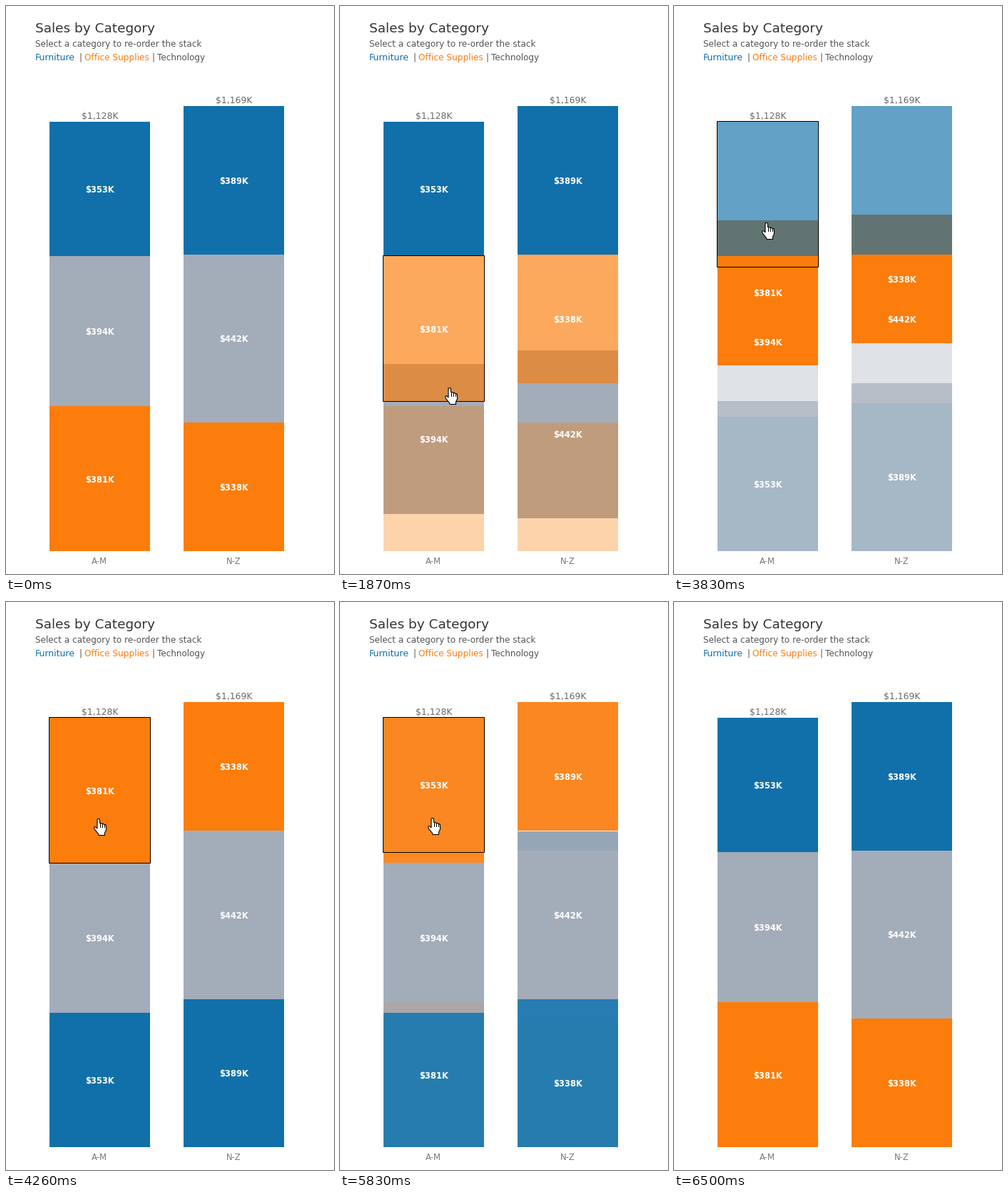
These frames come from a looping animation (460 px wide and 795 px high, 7520 ms). A matplotlib script:

```python
import math

import matplotlib.pyplot as plt
from matplotlib.animation import FuncAnimation
from matplotlib.patches import Polygon, Rectangle

W, H, DPI = 460, 795, 80
LOOP, STEP = 7520, 20
PX = 72 / DPI  # points per pixel

COLORS = {"F": "#1170aa", "O": "#fc7d0b", "T": "#a3acb9"}
FADED = {"F": "#cadbe4", "O": "#f5decb", "T": "#e4e6ea"}
LAYER = {"T": 2, "O": 3, "F": 4}
BASE, BAR_W = 763, 141
COLUMNS = [
    dict(x=61, name="A-M", total="$1,128K", top=162,
         size={"F": 188, "O": 203, "T": 210},
         text={"F": "$353K", "O": "$381K", "T": "$394K"}),
    dict(x=249, name="N-Z", total="$1,169K", top=140,
         size={"F": 207.4, "O": 180, "T": 235.3},
         text={"F": "$389K", "O": "$338K", "T": "$442K"}),
]

# Stack orders run from top to bottom; one mark slides, the others cross-fade.
FIRST = "FTO"
SORTS = [(1630, "FOT", "T"), (3740, "OTF", "O"), (5830, "FTO", "T")]
CLICKS = [(1160, 1630, "T"), (3270, 3740, "F"), (5370, 5830, "O")]
TICK, TICKS = 520 / 11, 11

HAND = [(5, 1.5), (6, .5), (7.5, .5), (8.5, 1.5), (8.5, 6.5), (11, 6.5),
        (11.7, 7.5), (14, 7.5), (14.7, 8.5), (16.5, 8.5), (17.5, 10),
        (17.5, 16), (15.5, 20), (15.5, 23.5), (7, 23.5), (6.5, 21.5),
        (1.5, 15.5), (.5, 13), (1.5, 11.5), (3, 12), (5, 14)]
ARROW = [(6, 0), (6, 16), (9.5, 12.7), (12, 18), (14.5, 17), (12, 11.5),
         (17, 11.5)]
KNUCKLES = [(8.5, 7), (11.5, 8), (14.5, 9)]

fig = plt.figure(figsize=(W / DPI, H / DPI), dpi=DPI, facecolor="white")
ax = fig.add_axes([0, 0, 1, 1])
ax.set_xlim(0, W)
ax.set_ylim(H, 0)
ax.axis("off")


def write(x, y, s, size, color, ha="left", **kw):
    return ax.text(x, y, s, fontsize=size * PX, color=color, ha=ha,
                   va="baseline", family="DejaVu Sans", parse_math=False, **kw)


def bar(x, z):
    return ax.add_patch(Rectangle((x, 0), BAR_W, 0, lw=0, zorder=z,
                                  antialiased=False))


write(41, 37, "Sales by Category", 18.5, "#333333")
write(41, 57, "Select a category to re-order the stack", 12.06, "#555555")
write(41, 76, "Furniture", 12.5, COLORS["F"])
write(110, 76, "Office Supplies", 12.15, COLORS["O"])
write(212, 76, "Technology", 12, "#555555")
for sep in (104.5, 207):
    write(sep, 76, "|", 12, "#555555", "center")

for col in COLUMNS:
    x = col["x"]
    mid = x + BAR_W / 2
    write(mid + .5, col["top"] - 4, col["total"], 12.4, "#666666", "center")
    write(mid - .5, 781, col["name"], 11.6, "#777777", "center")
    col["bars"] = {c: bar(x, LAYER[c]) for c in COLORS}
    col["ghosts"] = {c: bar(x, LAYER[c] + 3) for c in COLORS}
    col["labels"] = {c: write(mid, 0, s, 11.5, "white", "center",
                              weight="bold", zorder=9)
                     for c, s in col["text"].items()}

outline = ax.add_patch(Rectangle((0, 0), 0, 0, fill=False, ec="black",
                                 zorder=10, snap=False))
pointer = ax.add_patch(Polygon(HAND, fc="white", ec="black", lw=1.1 * PX,
                               zorder=11))
knuckles, = ax.plot([], [], color="black", lw=PX, zorder=12)


def snap(v):
    return math.floor(v + .5)


def stack(col, order):
    """Top and bottom of each category."""
    spans, y = {}, BASE
    for c in reversed(order):
        spans[c] = (y - col["size"][c], y)
        y -= col["size"][c]
    return spans


def sort_state(t):
    """Old order, new order, sliding category and fade progress."""
    old = new = FIRST
    slider, fade = None, 1
    for start, order, mover in SORTS:
        if t >= start:
            old, new, slider = new, order, mover
            tick = min(TICKS, (t - start + 6) // TICK)
            fade = 1 - (1 - (tick + .65) / (TICKS + .65)) ** 1.64
    return old, new, slider, fade


def glide(t, t0, t1, a, b):
    k = min(1, max(0, (t - t0) / (t1 - t0)))
    k = k * k * (3 - 2 * k)
    return tuple(round(p + (q - p) * k) for p, q in zip(a, b))


def pointer_at(t):
    if t < 640 or t >= 6500:
        return None
    if t < 2660:
        return glide(t, 600, 1130, (188, 800), (147, 534))
    if t < 4720:
        return glide(t, 2640, 2990, (147, 534), (123, 303))
    return glide(t, 6120, 6510, (123, 302), (176, 797))


def place(rect, span, color, alpha):
    top, bottom = map(snap, span)
    rect.set_y(top)
    rect.set_height(bottom - top)
    rect.set_facecolor(color)
    rect.set_alpha(alpha)
    rect.set_visible(alpha > 0)


def draw_column(col, old, new, slider, fade, picked):
    before, after = stack(col, old), stack(col, new)
    move = (1 - math.cos(math.pi * fade)) / 2
    for c in COLORS:
        a, b = before[c], after[c]
        still = abs(a[0] - b[0]) < .5
        solid = c == slider or still
        span = b
        if c == slider:
            span = tuple(p + (q - p) * move for p, q in zip(a, b))
        dim = picked and not (c == picked and col is COLUMNS[0])
        color = FADED[c] if dim else COLORS[c]
        place(col["bars"][c], span, color, 1 if solid else fade)
        place(col["ghosts"][c], a, color, 0 if solid else 1 - fade)
        label = col["labels"][c]
        label.set_y(snap(sum(span) / 2) + 5)
        label.set_color("#f0f1f2" if dim else "white")


def draw_pointer(pos, on_bar):
    pointer.set_visible(pos is not None)
    knuckles.set_visible(on_bar)
    if pos is None:
        return
    px, py = pos
    pointer.set_xy([(px + x, py + y) for x, y in (HAND if on_bar else ARROW)])
    xs, ys = [], []
    for x, y in KNUCKLES:
        xs += [px + x, px + x, math.nan]
        ys += [py + y, py + 12, math.nan]
    knuckles.set_data(xs, ys)


def update(i):
    t = i * STEP + STEP / 2
    old, new, slider, fade = sort_state(t)
    picked = next((c for a, b, c in CLICKS if a <= t < b), None)
    for col in COLUMNS:
        draw_column(col, old, new, slider, fade, picked)

    spans = stack(COLUMNS[0], new)
    pos = pointer_at(t)
    hover = None
    if pos:
        hover = next((c for c, (top, bottom) in spans.items()
                      if top <= pos[1] < bottom), None)
    draw_pointer(pos, hover is not None)

    target = picked or hover
    outline.set_visible(target is not None)
    if target:
        width = 2 if picked else 1
        top, bottom = map(snap, spans[target])
        outline.set_bounds(COLUMNS[0]["x"] - width / 2, top - width / 2,
                           BAR_W + width, bottom - top + width)
        outline.set_linewidth(width * PX)
    return []


anim = FuncAnimation(fig, update, frames=LOOP // STEP, interval=STEP,
                     repeat=True, repeat_delay=0)
plt.show()
```
